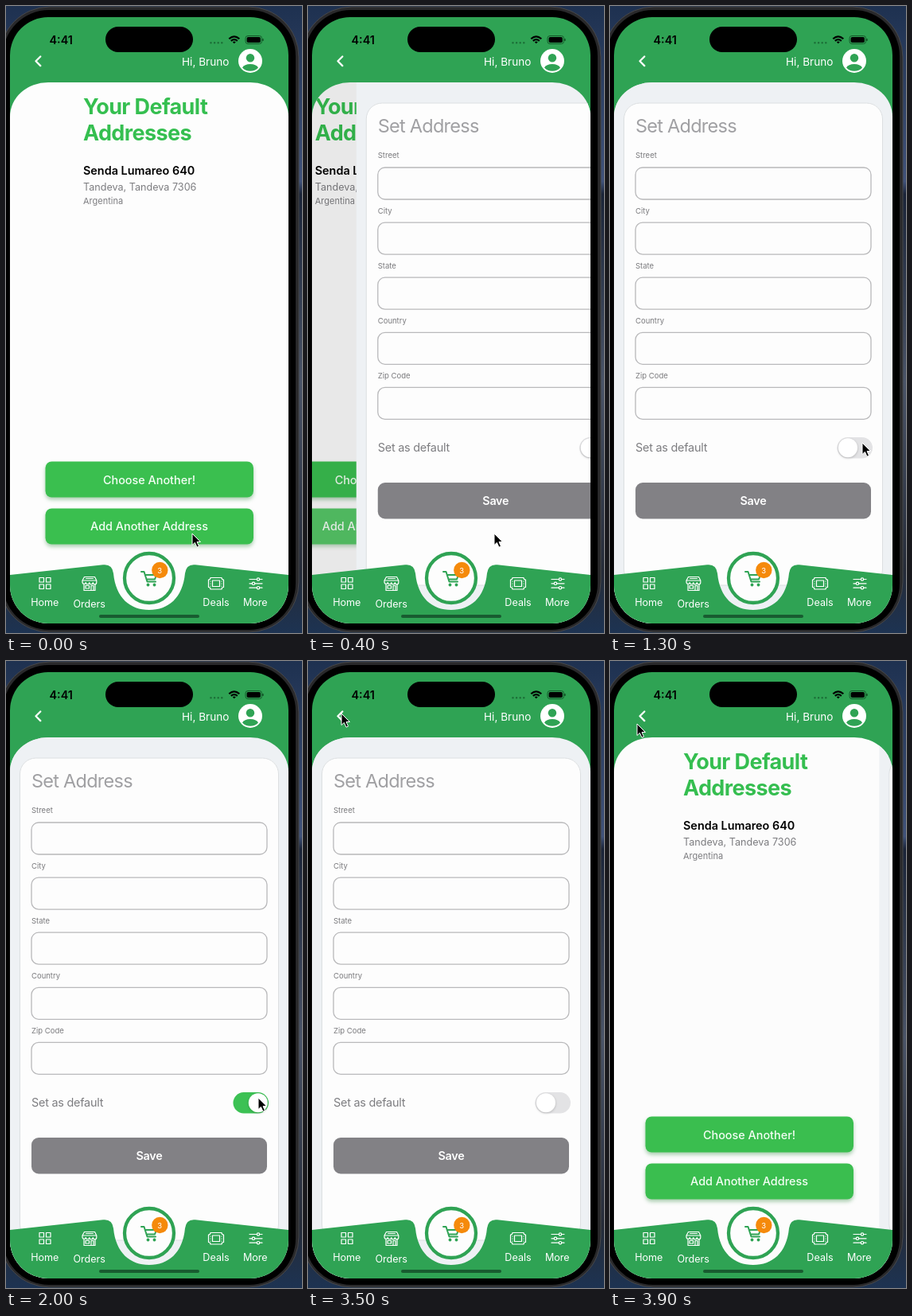
An HTML page that plays this animation: 372 by 788 pixels, repeating every 4 s.

```html
<!DOCTYPE html>
<html lang="en">
<head>
<meta charset="utf-8">
<title>Address book</title>
<style>
  html, body { margin: 0; width: 100%; height: 100%; overflow: hidden; background: #1b2a42; }
  svg { display: block; width: 372px; height: 788px; }
  text { font-family: Inter, sans-serif; font-optical-sizing: none; font-size: 14.4px; }
  .mid { text-anchor: middle; }
  .title { font-size: 27px; font-weight: 700; letter-spacing: -.6px; fill: #35bf50; }
  .label { font-size: 9.5px; fill: #7b7b7e; }
  .button { filter: drop-shadow(0 3px 2.5px #2d8a3c66); }
  .button text { fill: #f4fff5; font-weight: 500; }
  .tab { fill: #fff; font-size: 12.6px; text-anchor: middle; }
  .icon { fill: none; stroke: #fff; stroke-width: 1.2; stroke-linejoin: round; stroke-linecap: round; }
</style>
</head>
<body>
<svg viewBox="0 0 372 788">
  <defs>
    <linearGradient id="desk" x2="0" y2="1">
      <stop offset="0" stop-color="#1e3150"/>
      <stop offset=".28" stop-color="#40527a"/>
      <stop offset=".3" stop-color="#1a2438"/>
      <stop offset=".6" stop-color="#4a5468"/>
      <stop offset=".9" stop-color="#252b38"/>
      <stop offset="1" stop-color="#1d3352"/>
    </linearGradient>
    <clipPath id="screen"><rect x="5" y="14" width="350" height="762" rx="48"/></clipPath>
    <clipPath id="sheet"><rect x="5" y="96" width="350" height="720" rx="48" ry="43"/></clipPath>
  </defs>

  <rect width="372" height="788" fill="url(#desk)"/>
  <rect x="-8" y="1" width="376" height="786" rx="63" fill="#29292b" stroke="#47484b"/>
  <rect x="-4" y="5" width="368" height="779" rx="58"/>

  <g clip-path="url(#screen)">
    <rect x="5" y="14" width="350" height="762" fill="#2fa354"/>

    <g clip-path="url(#sheet)">
      <g id="listPage">
        <rect x="5" y="96" width="350" height="680" fill="#fdfdfd"/>
        <text class="title" x="97" y="136">Your Default</text>
        <text class="title" x="97" y="169">Addresses</text>
        <text x="97" y="212" font-weight="600">Senda Lumareo 640</text>
        <text x="97" y="231.5" fill="#7d7d80" style="font-size:12.6px">Tandeva, Tandeva 7306</text>
        <text x="97" y="249" fill="#7d7d80" style="font-size:11px">Argentina</text>
        <g class="button">
          <rect x="49.5" y="572.5" width="261.5" height="45" rx="8" fill="#3abf4f"/>
          <text class="mid" x="180" y="600.5">Choose Another!</text>
        </g>
        <g class="button" id="addButton">
          <rect x="49.5" y="631.5" width="261.5" height="45" rx="8" fill="#3abf4f"/>
          <text class="mid" x="180" y="659">Add Another Address</text>
        </g>
      </g>
      <rect id="dim" x="5" y="96" width="350" height="680"/>

      <g id="formPage">
        <rect x="5" y="96" width="350" height="680" fill="#eef1f4"/>
        <rect x="17.5" y="122" width="325" height="606" rx="20" fill="#fdfdfd" stroke="#dcdfe1"/>
        <text x="32" y="159" fill="#a0a0a3" style="font-size:23.5px;letter-spacing:-.75px">Set Address</text>
        <g id="fields"></g>
        <text x="32" y="560" fill="#7d7d80" letter-spacing="-.23">Set as default</text>
        <rect id="track" x="285.5" y="542" width="44.5" height="26.5" rx="13.25"/>
        <circle id="knob" cy="555.2" r="12" fill="#fff" style="filter:drop-shadow(0 1px 1.5px #0003)"/>
        <rect x="32" y="599" width="296" height="45.5" rx="9" fill="#828185"/>
        <text class="mid" x="180" y="627" fill="#fff" font-weight="600" letter-spacing="-.3">Save</text>
      </g>
    </g>

    <!-- status bar and header -->
    <text x="54.5" y="48" font-weight="600">4:41</text>
    <rect x="125" y="26" width="110" height="32" rx="16"/>
    <path d="M257.5 46.200h16" stroke="#1c7038" stroke-width="2.600" stroke-linecap="round" stroke-dasharray="0 4.600"/>
    <g fill="none" stroke="#000" stroke-width="2.200">
      <path d="M280.300 41.200q6.500-5.800 13 0M282.800 43.900q4-3.500 8 0"/>
      <path d="M286.800 47.300l-2-2q2-1.500 4 0z" fill="#000" stroke="none"/>
    </g>
    <rect x="301" y="37.500" width="20.500" height="10" rx="3" fill="none" stroke="#14582a"/>
    <rect x="302.600" y="39" width="17.300" height="7" rx="1.800"/>
    <path d="M323 41v3" stroke="#14582a" stroke-width="1.500"/>
    <path id="back" d="M43.300 63.500l-5.800 5.800 5.800 5.800" fill="none" stroke="#fff" stroke-width="2.300" stroke-linecap="round" stroke-linejoin="round"/>
    <text x="221" y="74.500" fill="#fff" style="font-size:13.600px">Hi, Bruno</text>
    <circle cx="307" cy="69" r="15" fill="#fff"/>
    <circle cx="307" cy="65.300" r="5.200" fill="#2fa354"/>
    <path d="M297 77.500q2.500-4.500 10-4.500t10 4.500q-4 4.300-10 4.300t-10-4.300z" fill="#2fa354"/>

    <!-- tab bar -->
    <path d="M5 715L122 702.300Q133.500 701 135 713C138 744 156 759 180 759S222 744 225 713Q226.500 701 238 702.300L355 715V776H5z" fill="#2fa354"/>
    <circle cx="180" cy="719" r="31" fill="#fdfdfd" stroke="#2fa354" stroke-width="4.300"/>
    <g fill="none" stroke="#2fa354" stroke-width="2" stroke-linejoin="round" stroke-linecap="round">
      <path d="M170 711h3.500l4 12.500h10.500M175 715h14l-2 5.500h-10"/>
    </g>
    <g fill="#2fa354"><circle cx="178.500" cy="727.500" r="1.900"/><circle cx="186.500" cy="727.500" r="1.900"/></g>
    <circle cx="193.300" cy="709" r="10.200" fill="#f58a0b"/>
    <text class="mid" x="193.300" y="712.500" fill="#fff" style="font-size:9.500px">3</text>

    <g class="icon">
      <path d="M42 718.500h5.500v5.500h-5.500zM50.500 718.500h5.500v5.500h-5.500zM42 727h5.500v5.500h-5.500zM50.500 727h5.500v5.500h-5.500z"/>
      <path d="M98.500 717.500h13l2.300 4.500v2.500a2.200 2.200 0 0 1-4.500 0a2.200 2.200 0 0 1-4.500 0a2.200 2.200 0 0 1-4.500 0a2.200 2.200 0 0 1-4.300 0v-2.500zM96 722h17.500M98 727v7.500h14v-7.500M100 728.500h4.500v3.500h-4.500zM107 734v-5.500h3v5.500M100.500 719.500h9"/>
      <path d="M257 718.500h14q0 2.500 2.500 2.500v9.500q-2.500 0-2.500 2.500h-14q0-2.500-2.500-2.500v-9.500q2.500 0 2.500-2.500zM259.500 722h9v7.500h-9zM257 723v.1M257 726v.1M257 729v.1M271 723v.1M271 726v.1M271 729v.1"/>
      <path d="M306 720.500h9M319 720.500h3M306 725.800h3M313 725.800h9M306 731.200h9M319 731.200h3"/>
      <circle cx="317" cy="720.500" r="1.700"/><circle cx="311" cy="725.800" r="1.700"/><circle cx="317" cy="731.200" r="1.700"/>
    </g>
    <text class="tab" x="48.800" y="754">Home</text>
    <text class="tab" x="104.700" y="755.500">Orders</text>
    <text class="tab" x="264" y="753.500">Deals</text>
    <text class="tab" x="313.300" y="753.500">More</text>
    <rect x="117" y="765" width="126" height="4" rx="2" fill="#185c30"/>
  </g>

  <path id="cursor" d="M0 0V14.500L3.400 11.400L6 17.200L8.500 16.100L6 10.500H10.500z" stroke="#fff" stroke-width="1" stroke-linejoin="round"/>
</svg>
<script>
const LOOP = 4000, STEP = 100, WIDTH = 350;
const $ = id => document.getElementById(id);

$('fields').innerHTML = ['Street', 'City', 'State', 'Country', 'Zip Code'].map((name, i) => {
  const y = 203 + i * 69.1;
  return `<text class="label" x="32" y="${y - 11.6}">${name}</text>
    <rect x="32" y="${y}" width="296" height="40" rx="9" fill="#fdfdfd" stroke="#b9b9bb" stroke-width="1.3"/>`;
}).join('');

// Pointer stops: time, x, y
const stops = [[0, 234, 663], [550, 234, 663], [1150, 317, 549], [2450, 317, 549],
  [2900, 181, 85], [3350, 42, 66], [3700, 42, 66], [3900, 34, 79]];

const ramp = (t, from, to) => {
  const u = Math.min(1, Math.max(0, (t - from) / (to - from)));
  return u * u * (3 - 2 * u);
};
// Critically damped spring, 0 to 1
const spring = (t, start) => {
  const u = Math.max(0, t - start) * .0182;
  return 1 - (1 + u) * Math.exp(-u);
};
// Opacity dip while a control is pressed
const press = (t, down, up) => 1 - .75 * (ramp(t, down, down + 100) - ramp(t, up, up + 250));
const mix = (a, b, u) => a + (b - a) * u;
const move = (id, x, y = 0) => $(id).setAttribute('transform', `translate(${x} ${y})`);

function pointer(t) {
  const i = stops.findIndex(s => s[0] > t);
  if (i < 0) return stops[stops.length - 1].slice(1);
  const [a, b] = [stops[i - 1], stops[i]];
  const u = ramp(t, a[0], b[0]);
  return [mix(a[1], b[1], u), mix(a[2], b[2], u)];
}

function draw(t) {
  const shown = spring(t, 219) - spring(t, 3636);
  move('listPage', -.3 * WIDTH * shown);
  move('formPage', WIDTH * (1 - shown));
  $('dim').setAttribute('opacity', .1 * shown);
  $('addButton').setAttribute('opacity', press(t, 80, 220));
  $('back').setAttribute('opacity', press(t, 3500, 3620));

  const on = ramp(t, 1450, 1700) - ramp(t, 2200, 2450);
  $('knob').setAttribute('cx', mix(299, 316.8, on));
  $('track').setAttribute('fill', `rgb(${mix(227, 60, on)},${mix(227, 193, on)},${mix(229, 84, on)})`);
  move('cursor', ...pointer(t));
}

function tick() {
  const t = performance.now() % LOOP;
  draw(Math.floor(t / STEP) * STEP);
  requestAnimationFrame(tick);
}
tick();
</script>
</body>
</html>
```
